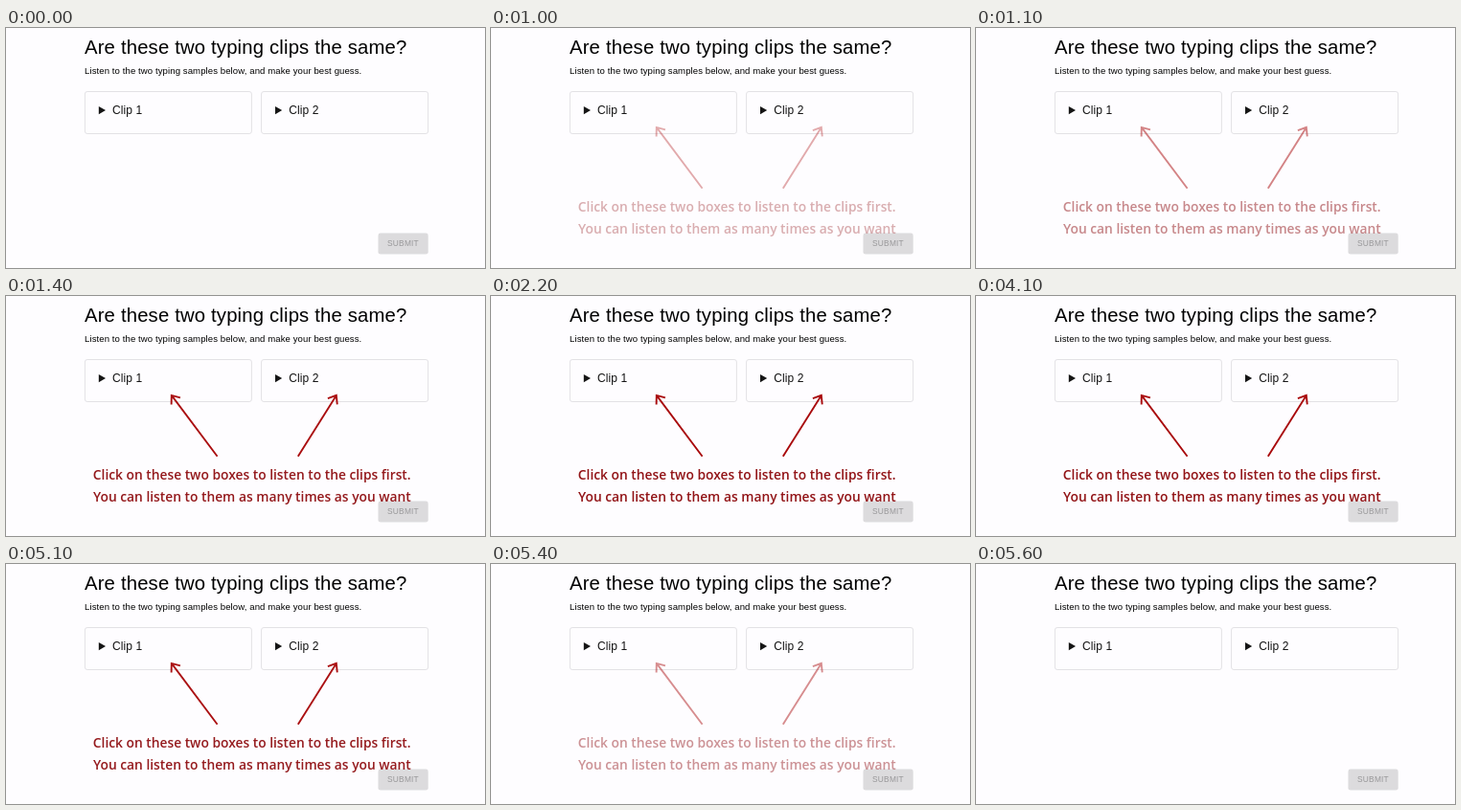
An HTML page with a canvas that plays this animation: 500x251 px, repeating every 5.7 s.

```html
<!DOCTYPE html>
<html lang="en">
<head>
<meta charset="utf-8">
<title>Typing clips</title>
<style>
html, body { margin: 0; width: 100%; height: 100%; overflow: hidden; background: #fefdff; }
canvas { display: block; width: 500px; height: 251px; }
</style>
</head>
<body>
<canvas id="stage"></canvas>
<script>
const W = 500, H = 251, LOOP = 5700, STEP = 100;
const NOTE_RED = '#921417', ARROW_RED = '#a90a0c';
const SANS = '"Liberation Sans", Arial, sans-serif';
const NOTE = '"Open Sans", sans-serif';
const canvas = document.getElementById('stage');
const ctx = canvas.getContext('2d');
const dpr = window.devicePixelRatio || 1;
canvas.width = W * dpr;
canvas.height = H * dpr;
ctx.scale(dpr, dpr);

function text(str, x, y, size, family, color, spacing = 0, weight = 400) {
  ctx.font = `${weight} ${size}px ${family}`;
  ctx.letterSpacing = spacing + 'px';
  ctx.fillStyle = color;
  ctx.fillText(str, x, y);
}

function box(x, y, w, h, r) {
  ctx.beginPath();
  ctx.roundRect(x, y, w, h, r);
}

function clip(x, label) {
  box(x + 0.4, 66.5, 174, 44, 2.5);
  ctx.strokeStyle = '#e3e2e5';
  ctx.lineWidth = 1;
  ctx.stroke();
  ctx.fillStyle = '#151515';
  ctx.beginPath();
  ctx.moveTo(x + 14.8, 82);
  ctx.lineTo(x + 22, 86.1);
  ctx.lineTo(x + 14.8, 90.2);
  ctx.fill();
  text(label, x + 29, 90.2, 12, SANS, '#111', 0.11);
}

function page() {
  ctx.fillStyle = '#fefdff';
  ctx.fillRect(0, 0, W, H);
  text('Are these two typing clips the same?', 82, 27, 20.3, SANS, '#000', 0.17);
  text('Listen to the two typing samples below, and make your best guess.',
    82, 48, 9.56, SANS, '#000', 0.1);
  clip(82, 'Clip 1');
  clip(266.2, 'Clip 2');
  box(388.5, 214.6, 52.2, 22, 2.4);
  ctx.fillStyle = '#dcdbdd';
  ctx.fill();
  text('SUBMIT', 398, 228.2, 8.35, SANS, '#989799', 0.24);
}

function arrow(x0, y0, x1, y1) {
  const back = Math.atan2(y0 - y1, x0 - x1);
  const barb = turn => [x1 + 9.5 * Math.cos(back + turn), y1 + 9.5 * Math.sin(back + turn)];
  ctx.beginPath();
  ctx.moveTo(x0, y0);
  ctx.lineTo(x1, y1);
  ctx.moveTo(...barb(0.66));
  ctx.lineTo(x1, y1);
  ctx.lineTo(...barb(-0.66));
  ctx.stroke();
}

function notes() {
  ctx.strokeStyle = ARROW_RED;
  ctx.lineWidth = 1.9;
  arrow(220.6, 167.8, 172.8, 103.9);
  arrow(304.8, 167.8, 344.8, 103.9);
  text('Click on these two boxes to listen to the clips first.', 90.8, 192.3, 13.8, NOTE, NOTE_RED, 0, 600);
  text('You can listen to them as many times as you want', 91, 215.4, 13.8, NOTE, NOTE_RED, 0, 600);
}

// The notes fade in 100 ms steps.
function noteAlpha(t) {
  const since = start => Math.floor((t - start) / STEP);
  if (t < 1000 || t >= 5600) return 0;
  if (t < 5100) return Math.min(1, 0.34 + 0.16 * since(1000));
  return 0.97 - 0.17 * since(5100);
}

function draw(t) {
  page();
  const alpha = noteAlpha(t);
  if (alpha > 0) {
    ctx.globalAlpha = alpha;
    notes();
    ctx.globalAlpha = 1;
  }
}

const begin = performance.now();
function tick() {
  draw((performance.now() - begin) % LOOP);
  requestAnimationFrame(tick);
}
tick();
</script>
</body>
</html>
```
